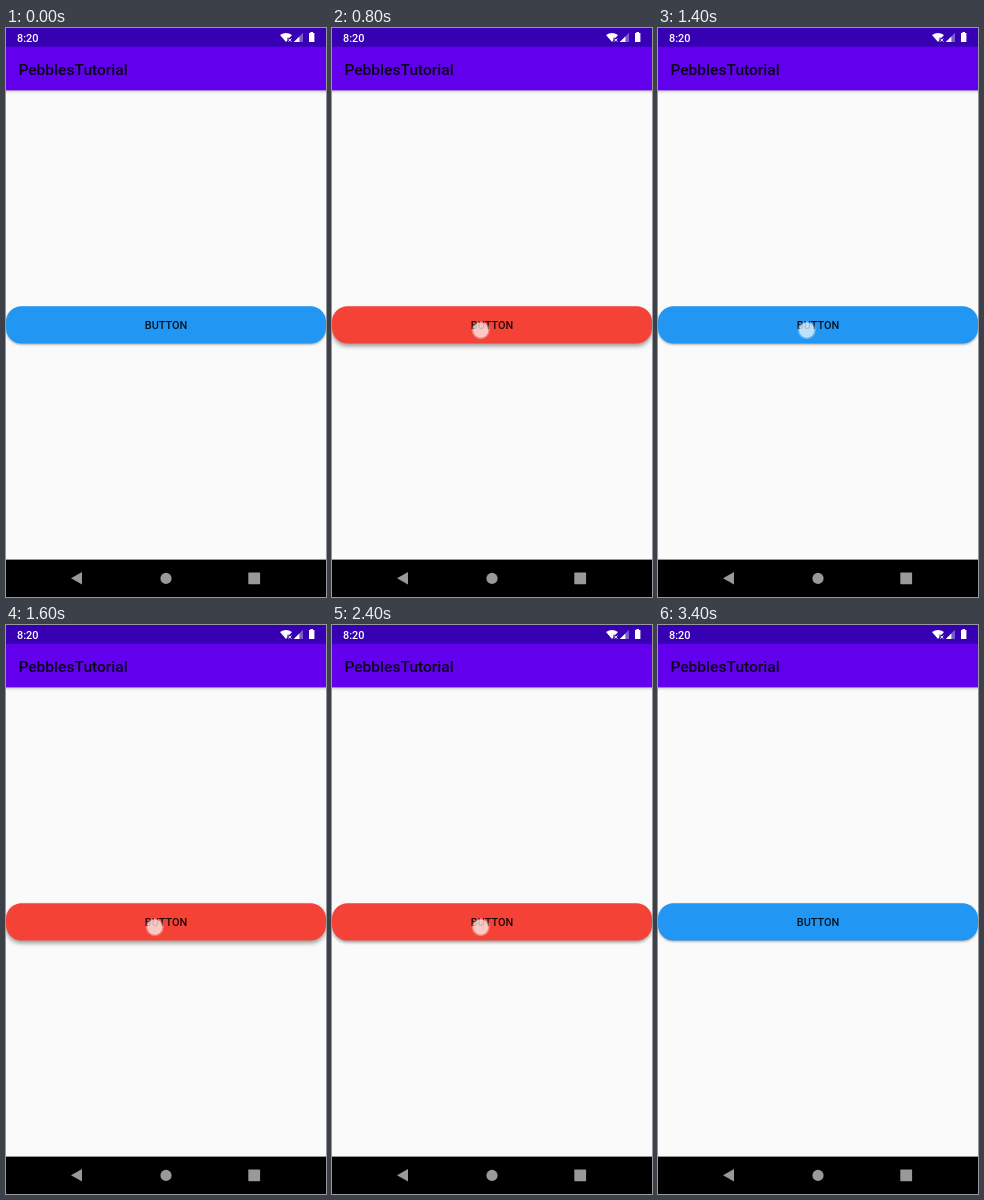
Recreate the animation shown at these times as an HTML page. Size 320x569 px, loop 3.5 s.

```html
<!DOCTYPE html>
<html lang="en">
<head>
<meta charset="utf-8">
<title>Button states</title>
<style>
  html, body { margin: 0; width: 100%; height: 100%; overflow: hidden; background: #fafafa; }
  svg { display: block; width: 100vw; height: 100vh; }
  text { font-family: Roboto, sans-serif; font-weight: 500; }
</style>
</head>
<body>
<svg viewBox="0 0 320 569">
  <defs>
    <linearGradient id="barShade" x1="0" y1="0" x2="0" y2="1">
      <stop offset="0" stop-color="#000" stop-opacity=".3"/>
      <stop offset=".4" stop-color="#000" stop-opacity=".1"/>
      <stop offset="1" stop-color="#000" stop-opacity="0"/>
    </linearGradient>
    <filter id="soft" filterUnits="userSpaceOnUse" x="-20" y="260" width="360" height="80">
      <feGaussianBlur id="blur" stdDeviation="1"/>
    </filter>
  </defs>

  <rect width="320" height="569" fill="#fafafa"/>
  <rect y="62" width="320" height="4" fill="url(#barShade)"/>
  <rect y="18" width="320" height="44.3" fill="#6200ee"/>
  <rect width="320" height="18.7" fill="#3700b3"/>
  <text x="11" y="13.6" font-size="10.9" fill="#fff">8:20</text>
  <text x="12.4" y="46.5" font-size="15.56" fill="#000" fill-opacity=".9">PebblesTutorial</text>

  <g id="status" fill="#fff">
    <path d="M274 7Q280 2.8 286 7L283.6 9.8H281.4V12.3L280 14Z"/>
    <path d="M282.3 10.6L285.3 13.6M285.3 10.6L282.3 13.6" stroke="#fff" stroke-width="1"/>
    <path d="M297 4.8V14H287.8Z" fill-opacity=".35"/>
    <path d="M293.4 8.4V14H287.8Z"/>
    <path d="M304.4 4H307V5H308.4V14H303V5H304.4Z"/>
  </g>

  <rect id="shadow" x="0" y="278.3" width="320" height="37.2" rx="15.6" filter="url(#soft)"/>
  <rect id="button" x="0" y="278.3" width="320" height="37.2" rx="15.6"/>
  <text x="160" y="301" font-size="10.9" text-anchor="middle" fill="#000" fill-opacity=".87">BUTTON</text>

  <g id="touch">
    <circle cx="148.8" cy="302.2" r="9" fill="#fff" fill-opacity=".28"/>
    <circle cx="148.8" cy="302.2" r="7.6" fill="#fff" fill-opacity=".6"/>
  </g>

  <rect y="531.6" width="320" height="37.4" fill="#000"/>
  <g id="nav" fill="#999">
    <path d="M65 550.3L76 544V556.6Z"/>
    <circle cx="160" cy="550.4" r="5.6"/>
    <rect x="242.3" y="544.5" width="11.8" height="11.8" rx=".8"/>
  </g>
</svg>
<script>
const LOOP = 3500, STEP = 100;
const BLUE = '#2196f3', RED = '#f44336';

// Times in ms: finger down, button pressed, finger up
const taps = [
  { down: 500, press: 600, up: 900 },
  { down: 1300, press: 1500, up: 1800 },
  { down: 2400, press: 2400, up: 2700 }
];

const get = id => document.getElementById(id);
const [button, shadow, blur, touch] = ['button', 'shadow', 'blur', 'touch'].map(get);
const clamp = v => Math.max(0, Math.min(1, v));

function liftAt(t, tap) {
  if (t < tap.press) return 0;
  if (t < tap.up) return clamp(0.6 + (t - tap.press) / 250);
  return clamp(0.6 - (t - tap.up) / 300);
}

function touchAt(t, tap) {
  if (t < tap.down) return 0;
  return t < tap.up ? 1 : clamp(0.6 - (t - tap.up) / 333);
}

function draw(time) {
  const t = Math.floor((time % LOOP) / STEP) * STEP;
  const pressed = taps.some(p => t >= p.press && t < p.up);
  const lift = Math.max(...taps.map(p => liftAt(t, p)));
  const finger = Math.max(...taps.map(p => touchAt(t, p)));

  button.setAttribute('fill', pressed ? RED : BLUE);
  shadow.setAttribute('y', 279.4 + 1.7 * lift);
  shadow.setAttribute('fill-opacity', 0.36 + 0.02 * lift);
  blur.setAttribute('stdDeviation', 0.9 + 1.1 * lift);
  touch.setAttribute('opacity', finger);
}

const start = performance.now();
function tick() {
  draw(performance.now() - start);
  requestAnimationFrame(tick);
}
draw(0);
requestAnimationFrame(tick);
</script>
</body>
</html>
```
